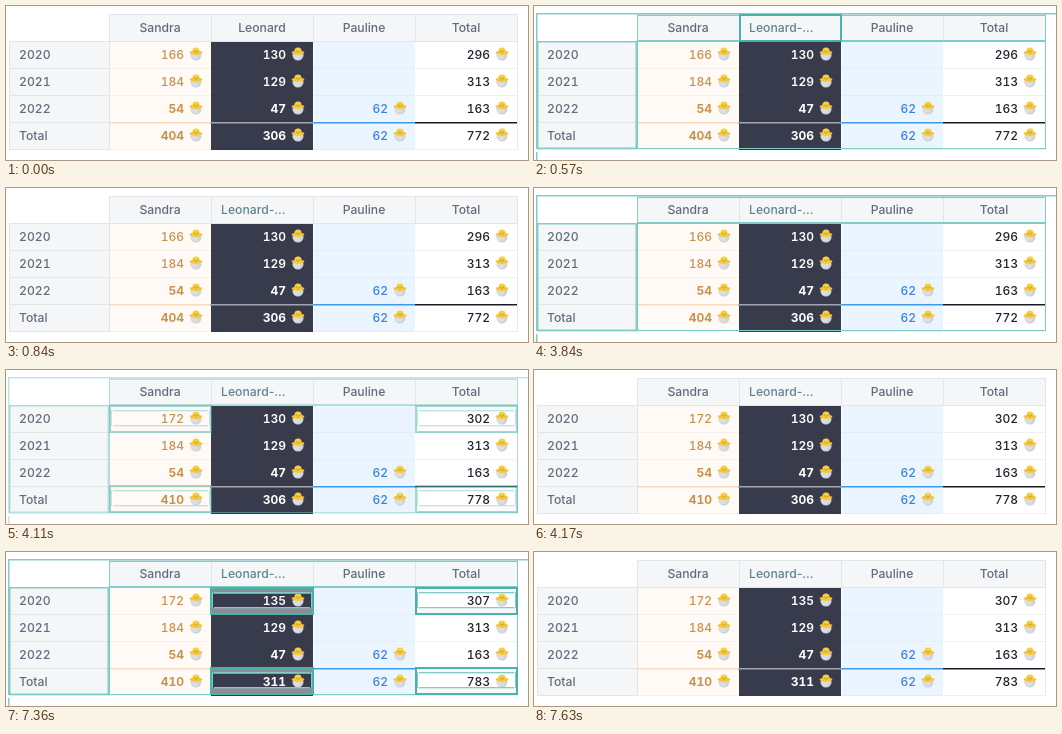
Animation of 522x154 px, one loop 8 s. Source, as an HTML page with a canvas:

```html
<!DOCTYPE html>
<html lang="en">
<head>
<meta charset="utf-8">
<title>Table updates</title>
<style>
html, body { margin: 0; width: 522px; height: 154px; overflow: hidden; background: #fff; }
body { position: relative; font: 500 12.2px/20px Inter, "Open Sans", sans-serif; }
canvas { position: absolute; left: 0; top: 0; display: block; }
span { position: absolute; white-space: pre; }
.num, .year { font-variant-numeric: tabular-nums; }
.num { font-size: 12px; text-align: right; width: 60px; }
.mid { text-align: center; width: 102px; }
</style>
</head>
<body>
<canvas id="stage" width="522" height="154"></canvas>
<script>
const ctx = document.getElementById('stage').getContext('2d');
const LOOP = 8000;
const GREY = '#646b7c', TEAL = '#48b3ac', SOFT = '#80cdc7';
const rowY = [48.5, 75.5, 102.5, 129.5];
const cols = [
  { x: 104, w: 101, fill: '#fffaf5', line: '#fad9c2', edge: '#f8f1eb', ink: '#c8924f', weights: [500, 500, 700, 700] },
  { x: 205, w: 102, fill: '#373b4c', line: '#a5a6ad', edge: '#343848', ink: '#ffffff', weights: [600, 600, 700, 700] },
  { x: 308, w: 101, fill: '#ebf5ff', line: '#3c9bea', edge: '#e1edf9', ink: '#3981d8', weights: [500, 500, 500, 500] },
  { x: 410, w: 101, fill: '#ffffff', line: '#191b26', edge: '#f0f0f2', ink: '#20222f', weights: [500, 500, 500, 500] }
];

function label(text, x, y, color, cls = '', weight = 500) {
  const el = document.createElement('span');
  el.textContent = text;
  el.className = cls;
  el.style.cssText = `left:${x}px;top:${y - 10}px;color:${color};font-weight:${weight}`;
  document.body.append(el);
  return el;
}

const heads = ['Sandra', 'Leonard', 'Pauline', 'Total'].map((name, i) =>
  label(name, cols[i].x - 1, 22, GREY, 'mid'));
['2020', '2021', '2022', 'Total'].forEach((name, i) => label(name, 13, rowY[i], GREY, 'year'));
const cells = cols.map((c, i) => rowY.map((y, r) =>
  label('', 118 + i * 102, y, c.ink, 'num', c.weights[r])));

function rect(x, y, w, h, color) {
  ctx.fillStyle = color;
  ctx.fillRect(x, y, w, h);
}

function frame(x, y, w, h, color, thick = 1) {
  ctx.strokeStyle = color;
  ctx.lineWidth = thick;
  ctx.strokeRect(x + thick / 2, y + thick / 2, w - thick, h - thick);
}

function oval(x, y, rx, ry, color, from = 0, to = 2 * Math.PI) {
  ctx.fillStyle = color;
  ctx.beginPath();
  ctx.ellipse(x, y, rx, ry, 0, from, to);
  ctx.fill();
}

// Small hatching chick
function chick(x, y) {
  oval(x, y + 1.2, 5.5, 5.3, '#d0d2d6');
  oval(x - 1, y + 2, 3.5, 3.2, '#dcdde0');
  oval(x, y - 2.6, 3.7, 3.8, '#f8cf3c');
  oval(x - 4, y - 1.4, 2.4, 1.3, '#f2c233');
  oval(x + 4, y - 1.4, 2.4, 1.3, '#f2c233');
  oval(x, y - 0.9, 4.5, 1.5, '#f2c83c');
  oval(x, y - 2, 1, 0.7, '#ec9530');
  oval(x - 1.8, y - 2.9, 0.4, 0.5, '#6e5a2c');
  oval(x + 1.8, y - 2.9, 0.4, 0.5, '#6e5a2c');
}

function table(values) {
  rect(0, 0, 522, 154, '#fff');
  rect(103, 8, 409, 28, '#f5f6f8');
  rect(3, 35, 101, 109, '#f5f6f8');
  frame(103, 8, 409, 28, '#e4e5e9');
  frame(3, 35, 101, 109, '#e4e5e9');
  for (const x of [205, 307, 409]) rect(x, 9, 1, 26, '#e4e5e9');
  for (const y of [62, 89, 116]) rect(4, y, 99, 1, '#e4e5e9');
  cols.forEach((c, i) => {
    rect(c.x, 36, c.w, 108, c.fill);
    for (const y of [62, 89, 143]) rect(c.x, y, c.w, 1, c.edge);
    rect(c.x - 1, 116, c.w + 1, 1.5, c.line);
    values[i].forEach((v, r) => { if (v) chick(190 + i * 102, rowY[r] - 0.5); });
  });
  rect(511, 36, 1, 108, '#e8e9ec');
}

function outerBoxes() {
  rect(2, 7, 520, 1.5, SOFT);
  rect(2, 7, 1.5, 136, SOFT);
  rect(2, 146, 1.5, 8, SOFT);
  frame(103, 9, 409, 26, SOFT);
  frame(3, 35, 100, 108, SOFT, 1.5);
  frame(103, 35, 409, 108, SOFT);
}

function cellBox(col, row) {
  const x = cols[col].x - 1, w = cols[col].w + 2;
  const y = 35 + row * 27 - (row ? 1 : 0);
  const band = col === 1 ? '#8b8e97' : '#f7f8f7';
  for (const dy of [2, 21]) rect(x + 2, y + dy, w - 4, 5, band);
  for (const dy of [5, 20]) rect(x + 4, y + dy, w - 8, 1.3, SOFT);
  frame(x, y, w, 28, TEAL, 2);
  for (const dx of [2, w - 3]) rect(x + dx, y + 5, 1, 16, SOFT);
}

function valuesAt(t) {
  const a = t < 3910 ? 0 : 6, b = t < 7360 ? 0 : 5;
  return [
    [166 + a, 184, 54, 404 + a],
    [130 + b, 129, 47, 306 + b],
    ['', '', 62, 62],
    [296 + a + b, 313, 163, 772 + a + b]
  ];
}

function changed(col) {
  for (const c of [col, 3]) for (const r of [0, 3]) cellBox(c, r);
}

// Outer boxes show from start, changed cells from full, all fade before end
const flashes = [
  { start: 500, full: 570, fade: 770, end: 840, draw: () => frame(205, 8, 103, 28, TEAL, 2) },
  { start: 3840, full: 3910, fade: 4110, end: 4170, draw: () => changed(0) },
  { start: 7360, full: 7360, fade: 7630, end: 7630, draw: () => changed(1) }
];

function render(t) {
  const values = valuesAt(t), long = t >= 570;
  table(values);
  const flash = flashes.find(f => t >= f.start && t < f.end);
  if (flash) {
    ctx.globalAlpha = t >= flash.fade ? 0.5 : 1;
    outerBoxes();
    if (t >= flash.full) flash.draw();
    ctx.globalAlpha = 1;
  }
  cells.forEach((list, i) => list.forEach((el, r) => { el.textContent = values[i][r]; }));
  const head = heads[1];
  head.textContent = long ? 'Leonard-...' : 'Leonard';
  head.style.textAlign = long ? 'left' : 'center';
  head.style.left = (long ? 215 : 205) + 'px';
  head.style.color = long ? '#5f858d' : GREY;
}

const begin = performance.now();
function tick() {
  render((performance.now() - begin) % LOOP);
  requestAnimationFrame(tick);
}
tick();
</script>
</body>
</html>
```
